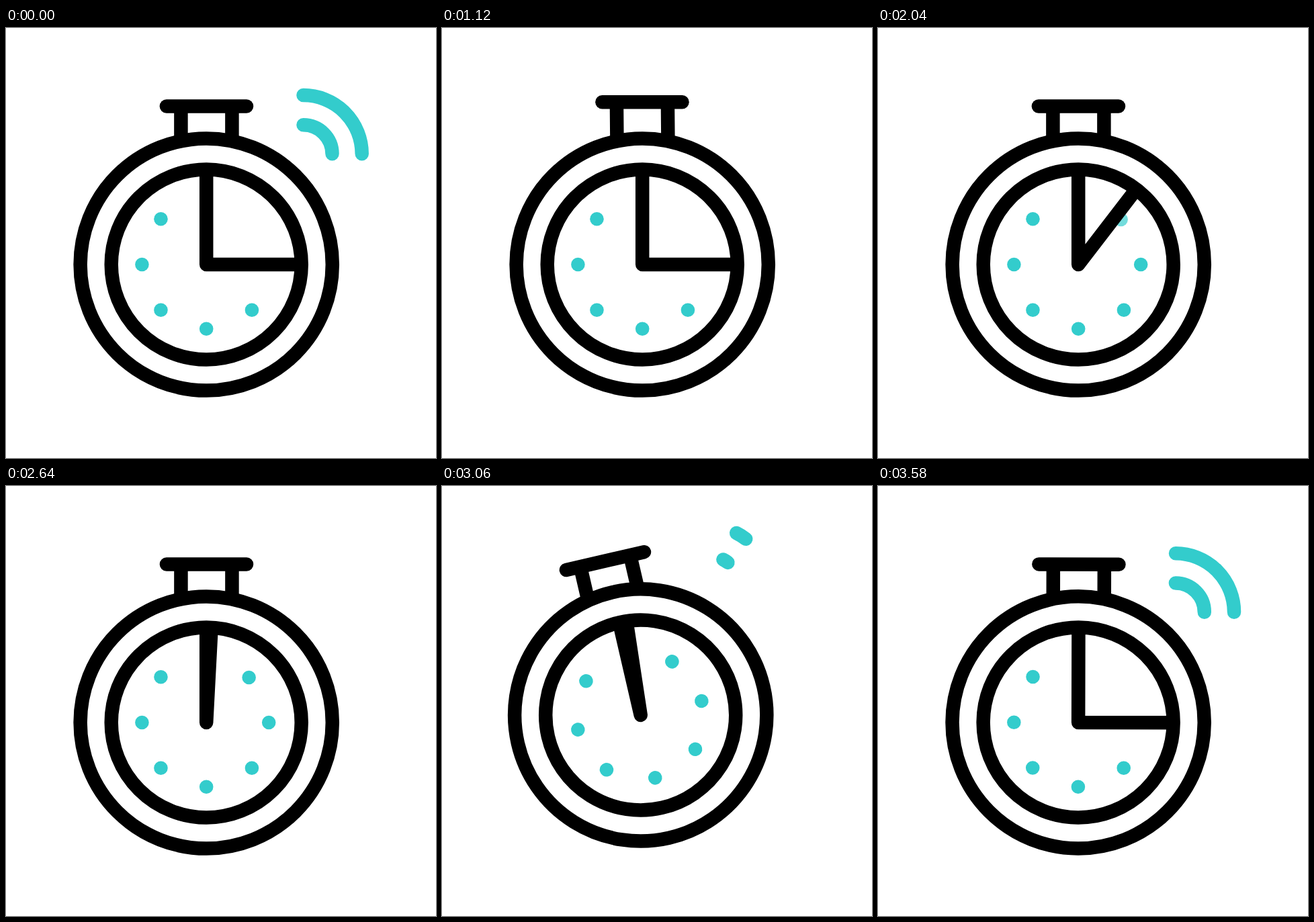
These frames come from a looping animation (640 px wide and 640 px high, 3600 ms). An HTML page:

```html
<!DOCTYPE html>
<html lang="en">
<head>
<meta charset="utf-8">
<title>Stopwatch</title>
<style>
  html, body { margin: 0; width: 100%; height: 100%; overflow: hidden; background: #fff; }
  svg { display: block; width: 100vw; height: 100vh; }
</style>
</head>
<body>
<svg viewBox="0 0 640 640" fill="none" stroke-width="20.5" stroke-linecap="round" stroke-linejoin="round">
  <g id="watch">
    <g id="waves" stroke="#33cccc">
      <path id="outer"/>
      <path id="inner"/>
    </g>
    <g id="body" stroke="#000">
      <path id="stems" stroke-linecap="butt"/>
      <path id="bar"/>
      <circle cx="298.2" cy="352" r="187.6"/>
      <g id="dots" fill="#33cccc" stroke="none"></g>
      <path id="hands" stroke-linecap="butt"/>
      <circle cx="298.2" cy="352" r="141.5"/>
    </g>
  </g>
</svg>
<script>
const LOOP = 3600, CX = 298.2, CY = 352;
const $ = id => document.getElementById(id);
const clamp = v => Math.max(0, Math.min(1, v));
const ease = u => u * u * (3 - 2 * u);

// Eased value through [time, value] keys
function track(keys, t) {
  if (t <= keys[0][0]) return keys[0][1];
  for (let i = 1; i < keys.length; i++) {
    const [t0, a] = keys[i - 1], [t1, b] = keys[i];
    if (t < t1) return a + (b - a) * ease((t - t0) / (t1 - t0));
  }
  return keys[keys.length - 1][1];
}

// Point at a clock angle (degrees from twelve)
function polar(x, y, r, deg) {
  const a = deg * Math.PI / 180;
  return [x + r * Math.sin(a), y - r * Math.cos(a)];
}

const PRESS = [[670, 0], [880, 18], [1100, -7], [1205, 0]];
const HAND = [[1270, 90], [2625, 3], [3027, 3], [3487, 90]];
const SWING = [[2640, 0], [2730, 24], [2980, -20], [3290, 21.3], [3595, 0]];
const HOP = [[2640, 0], [2730, 1], [3290, 1], [3595, 0]];
const SPAN = [[0, 45], [350, 0], [3000, 0], [3280, 45]];

function addDot(deg, r) {
  const dot = document.createElementNS("http://www.w3.org/2000/svg", "circle");
  const [x, y] = polar(CX, CY, r, deg);
  dot.setAttribute("cx", x);
  dot.setAttribute("cy", y);
  dot.setAttribute("r", 10.3);
  $("dots").appendChild(dot);
  return dot;
}
for (const deg of [135, 180, 225, 270, 315]) addDot(deg, 95.8);
const fading = [[90, addDot(90, 93)], [43.4, addDot(43.4, 92.3)]];

function arc(r, half) {
  const from = polar(442.5, 187.3, r, 45 - half);
  const to = polar(442.5, 187.3, r, 45 + half);
  return `M${from}A${r} ${r} 0 0 1 ${to}`;
}

function draw(t) {
  const press = track(PRESS, t);
  const y = 116.6 + press, dx = Math.min(0, press) * 0.08;
  $("bar").setAttribute("d", `M${238.9 + dx} ${y}H${358 + dx}`);
  $("stems").setAttribute("d", `M${260.4 + dx} ${y}L260.4 166M${336.4 + dx} ${y}L336.4 166`);
  $("body").setAttribute("transform", `translate(0 ${Math.max(0, press) / 12})`);

  const hand = track(HAND, t);
  $("hands").setAttribute("d", `M${CX} 211L${CX} ${CY}L${polar(CX, CY, 141, hand)}`);
  for (const [deg, dot] of fading) dot.setAttribute("opacity", clamp((deg - hand) / 8.5));

  const half = Math.max(0.3, track(SPAN, t));
  $("outer").setAttribute("d", arc(87.2, half));
  $("inner").setAttribute("d", arc(43, half));
  $("waves").setAttribute("visibility", t < 340 || t >= 2845 ? "visible" : "hidden");

  const hop = track(HOP, t);
  $("watch").setAttribute("transform",
    `translate(${-5.9 * hop} ${-11.35 * hop}) rotate(${track(SWING, t)} 301.4 337.2)`);
}

const start = performance.now();
function tick() {
  draw((performance.now() - start) % LOOP);
  requestAnimationFrame(tick);
}
draw(0);
requestAnimationFrame(tick);
</script>
</body>
</html>
```
